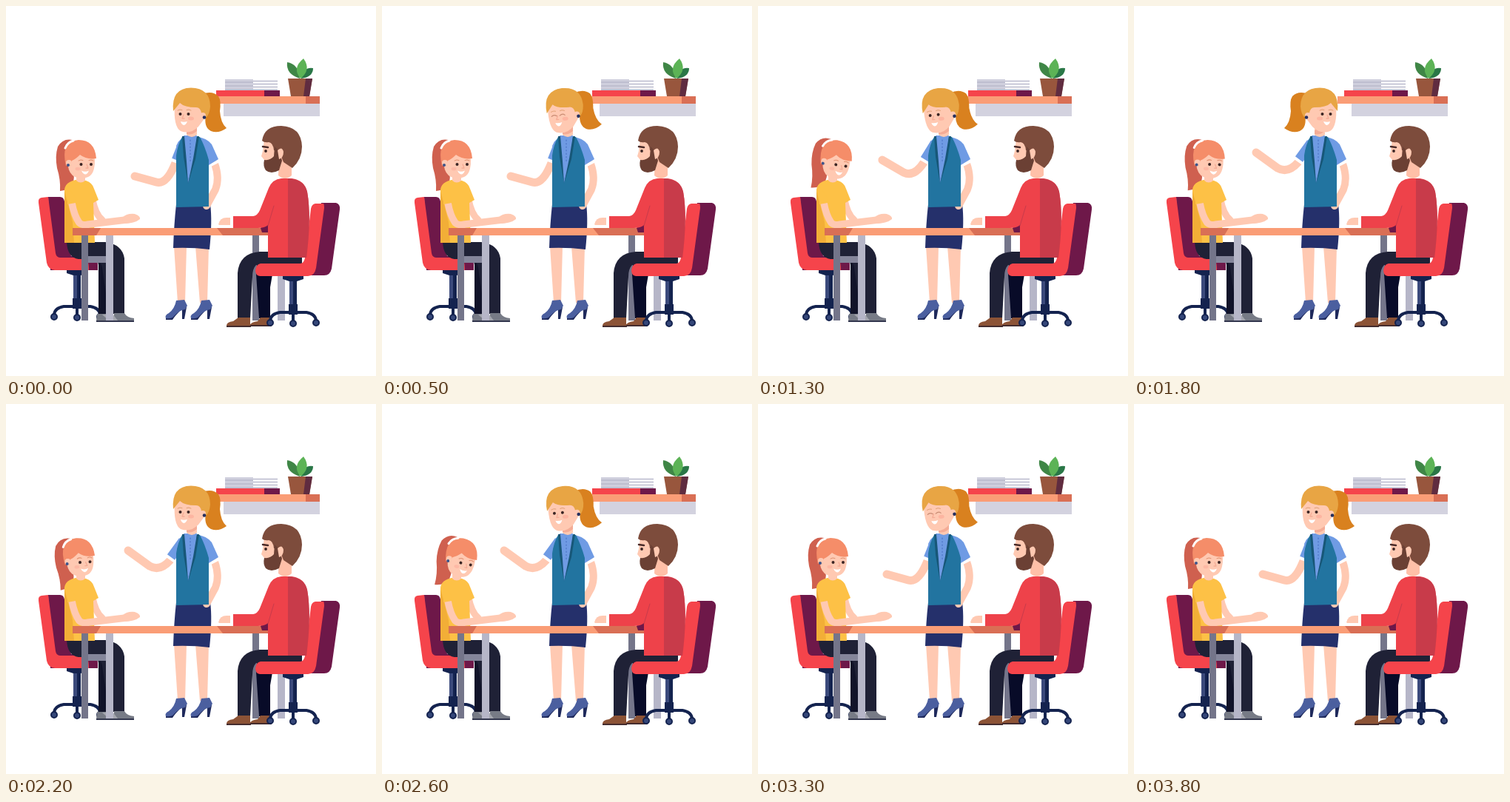
Write an HTML page that moves like this. It is 500 px wide and 500 px high and loops after 4000 ms.

```html
<!DOCTYPE html>
<html lang="en">
<head>
<meta charset="utf-8">
<title>Office meeting</title>
<style>
html, body { margin: 0; width: 100%; height: 100%; overflow: hidden; background: #fff; }
svg { display: block; width: 100vw; height: 100vh; }
.skin { fill: #ffc9b2; }
.limb { fill: none; stroke: #ffc9b2; stroke-linecap: round; stroke-linejoin: round; }
.red { fill: #f5444b; }
.plum { fill: #6e1849; }
.navy { fill: #14234f; }
.line { fill: none; stroke-linecap: round; stroke-linejoin: round; }
.cut { fill: none; }
</style>
</head>
<body>
<svg viewBox="0 0 500 500">
<defs>
  <g id="base">
    <path fill="#3b4a7c" d="M-5-47H5V-6H-5z"/>
    <path class="navy" d="M-14-47H14V-43L5-40H-5L-14-43zM0-47H5V-6H0zM-6-9H6V5H-6z"/>
    <path class="line" stroke="#14234f" stroke-width="4" d="M-31 13Q-30 4 -18 2H18Q30 4 31 13M0 2V14"/>
    <g fill="#354779" stroke="#14234f" stroke-width="2"><circle cx="-31" cy="16" r="4"/><circle cx="31" cy="16" r="4"/><circle cy="17" r="4"/></g>
  </g>
  <g id="heel">
    <path fill="#1f2a5c" d="M26 4L28 8 25 24H22L22 10Q12 20 9 25H0V22z"/>
    <path fill="#4b5f9f" d="M14-1L25-2 29 6 26 11Q18 12 11 20Q8 24 0 23Q-2 19 4 16Q12 10 14-1z"/>
  </g>
</defs>

<!-- shelf -->
<path fill="#d3d2df" d="M294 132H424V149H294z"/>
<path fill="#fa9d76" d="M275 122H424V132H275z"/>
<path fill="#d96f55" d="M405 122H424V132H405z"/>
<path class="red" d="M284 114H350V122H284z"/>
<path class="plum" d="M349 114H370V122H349z"/>
<path fill="#cfcfdd" d="M296 99H334V114H296z"/>
<path stroke="#b9b9cc" stroke-width="1.300" d="M296 103H334M296 108H334M296 113H367M334 101.500H367M334 105.500H367M334 109.500H367"/>
<path fill="#3f8646" d="M397 98Q378 92 380 76Q395 78 397 98z"/>
<path fill="#2a7747" d="M399 98Q401 82 415 84Q415 96 399 98z"/>
<path fill="#5cb356" d="M398 98Q386 84 402 71Q413 86 398 98z"/>
<path fill="#98563d" d="M381 98H414L410 122H385z"/>
<path fill="#602c40" d="M405 98H414L410 122H402z"/>

<!-- standing woman -->
<path class="skin" d="M227 325H244L242 401H232zM256 325H274L272 401H262z"/>
<use href="#heel" x="216" y="399"/><use href="#heel" x="250" y="399"/>
<path fill="#25306b" d="M230 268H276Q279 290 275 329Q252 326 226 327Q227 295 230 268z"/>
<path id="arm" class="limb" stroke-width="11"/>
<path id="cuff" class="cut" stroke="#fff" stroke-width="13"/>
<path id="sleeve" class="cut" stroke="#6f9be4" stroke-width="12.500"/>
<path class="limb" stroke-width="10" d="M282 213Q289 233 283 248L271 270"/>
<path fill="#fff" d="M272 215L288 207 289 211 275 218z"/>
<path fill="#6f9be4" d="M258 177Q271 178 278 187L287 207 274 215 266 205z"/>
<path fill="#6f9be4" d="M241 177Q234 180 230 189L236 205z"/>
<path fill="#2274a0" d="M238 177H262Q269 190 274 208L274 271 230 272 230 202Q232 187 238 177z"/>
<path fill="#6f9be4" d="M240 175H258L255 205 246 239 242 205z"/>
<path fill="#175778" d="M238 176H241L244 210 246 240 240 204zM258 176H261L256 207 246 240 253 206z"/>
<path class="line" stroke="#4970c2" stroke-dasharray="1.500 3" d="M249 181V212"/>
<path class="skin" d="M244 155H258V174Q251 180 244 174z"/>
<path fill="#f4ac96" d="M244 168L258 162V169Q251 175 244 173z"/>
<g id="womanHead">
  <path fill="#d9811f" d="M265 119Q279 114 287 122Q291 128 289 142Q290 158 298 165Q287 173 277 169Q267 164 270 148z"/>
  <path class="skin" d="M228 133Q226 163 236 169Q249 174 260 163L269 151 266 122H235z"/>
  <path fill="#e8a544" d="M226 142Q223 111 250 110.500Q276 111 276 136Q275 147 270 151L264 145Q263 137 257 137Q241 137 235 131Q231 136 226 142z"/>
  <circle class="skin" cx="266" cy="148" r="4"/><circle cx="268" cy="150.500" r="2.300" fill="#26305f"/>
  <g id="openEyes" fill="#3b2524"><circle cx="235.500" cy="146" r="2"/><circle cx="246.500" cy="146" r="2"/></g>
  <path id="shutEyes" class="line" stroke="#c98c74" stroke-width="1.200" d="M232 147Q235 144 239 147M243 147Q247 144 250 147"/>
  <path class="line" stroke="#e0a076" d="M232 141Q235 139 238 140.500M244 140.500Q247 139 250 141"/>
  <path class="line" stroke="#f4ac96" stroke-width="1.300" d="M240 147L238 152H241"/>
  <ellipse cx="250" cy="152" rx="4" ry="2.500" fill="#fdb5a1"/>
  <path fill="#fff" d="M236 156Q240 157.500 245 156Q243 161 240 161Q237 160 236 156z"/>
</g>

<!-- seated girl -->
<path class="plum" d="M57 258H73Q78 258 79 264L88 338H112Q124 339 124 350V357H60z"/>
<path class="red" d="M48 259L57 258 67 334Q68 340 74 340H106Q112 341 112 357H66Q57 356 55 347L44 266Q43 260 48 259z"/>
<use href="#base" x="96" y="404"/>
<path fill="#111329" d="M90 325H130Q142 328 142 342V416H125V350Q124 342 114 342H98z"/>
<path fill="#1f2136" d="M82 319H134Q157 322 160 341V416H139L130 354Q128 342 116 342H98Q83 340 82 319z"/>
<path fill="#777b86" d="M123 416H143L151 426H122zM146 415H160Q163 421 173 422V426H146z"/>
<path fill="#a4a6ae" d="M130 417L139 425H151L144 416z"/>
<path stroke="#32364e" stroke-width="2" d="M122 426H173"/>
<path id="girlTail" fill="#cf604f" d="M90 181Q77 178 70 190Q66 203 69 219Q74 235 73 250Q86 249 91 238Q94 226 86 214L83 195z"/>
<path class="limb" stroke-width="9" d="M117 262Q121 282 130 289"/>
<path fill="#fdc146" d="M86 238Q96 232 108 236Q117 239 119 247L125 262 118 266 120 320H79V248Q80 241 86 238z"/>
<path fill="#f2ae37" d="M79 250L84 268 90 292 92 320H79z"/>
<path class="limb" stroke-width="9.500" d="M89 266Q92 283 99 293Q103 297 112 295L162 289"/>
<path class="skin" d="M157 286Q163 280 174 281Q182 284 181 288Q174 294 158 294z"/>
<path fill="#fdc146" d="M82 242L95 261 94 266 83 268z"/>
<path class="skin" d="M95 225H107V236Q101 241 95 236z"/>
<g id="girlHead">
  <path class="skin" d="M83 207Q83 223 90 229Q100 236 111 231Q120 227 120 209L119 196H88z"/>
  <path fill="#f58d69" d="M81 216Q73 183 98 181Q120 181 122 206Q109 208 100 201Q94 207 89 209L87 216z"/>
  <path class="line" stroke="#fff" stroke-width="3" d="M80 192Q83 184 91 182"/>
  <circle class="skin" cx="85" cy="212" r="4"/><circle cx="84" cy="215" r="2" fill="#3e568c"/>
  <g fill="#3b2524"><circle cx="101.500" cy="214" r="2"/><circle cx="115" cy="214" r="2"/></g>
  <path class="line" stroke="#e0906f" d="M98 209Q101 207 104 208.500M112 208.500Q115 207 118 209"/>
  <path class="line" stroke="#f4ac96" stroke-width="1.300" d="M109 214L111 219H108"/>
  <ellipse cx="97" cy="220" rx="3.500" ry="2.300" fill="#fdb9a5"/>
  <path fill="#fff" d="M102 222.500Q107 225 112 222.500Q110 227.500 107 227.500Q104 227 102 222.500z"/>
</g>

<!-- table -->
<path fill="#74758a" d="M102 310H111V425H102zM333 310H342V425H333z"/>
<path fill="#85869b" d="M111 338H135V347H111z"/>
<path fill="#b6b6c8" d="M135 310H145V425H135zM367 310H377V425H367z"/>
<path fill="#fa9d76" d="M90 300H356V310H90z"/>
<path fill="#d96f55" d="M90 300H128L122 310H90zM285 300H356V310H293z"/>

<!-- seated man -->
<path class="plum" d="M344 300L355 288V306H346z"/>
<path fill="#080b28" d="M340 340H364L357 380V422H342L338 362z"/>
<path fill="#1f2136" d="M362 332H400V350H338Q333 355 333 366L330 422H313V361Q315 334 343 332z"/>
<path fill="#8c5336" d="M314 421H330V432H298Q298 427 307 426zM344 421H357L359 431 329 432Q331 427 340 426z"/>
<path stroke="#442c2e" stroke-width="2" d="M298 433H331M330 432H359"/>
<path class="plum" d="M426 266H446Q452 268 451 275L440 355Q438 364 430 364H408z"/>
<path class="red" d="M418 267H429Q430 268 430 273L419 354Q417 365 408 365H343Q337 364 337 357Q338 349 344 348H398Q403 347 404 340L412 274Q413 268 418 267z"/>
<use href="#base" x="388" y="412"/>
<path class="skin" d="M287 295Q289 286 298 286H306V296H288z"/>
<path fill="#fff" d="M303 285H309V299H303z"/>
<path fill="#ee424a" d="M372 233H386Q403 235 407 251Q413 285 406 340H354V296Q350 300 340 300H307V284H334Q340 283 343 276L355 246Q360 234 372 233z"/>
<path fill="#c83b4a" d="M381 233Q403 234 407 251Q413 285 406 340H381z"/>
<path class="line" stroke="#c83b4a" d="M354 297L362 270"/>
<path fill="#ffc0a8" d="M369 204H386V229Q377 237 368 229z"/>
<path class="skin" d="M349 180L347 196 345 203 349 208 350 213H372V178z"/>
<path fill="#7d4c3c" d="M346 182Q349 162 372 162Q399 163 400 190Q400 207 387 219L375 211 369 196 362 195Q361 185 355 184Q349 185 346 182z"/>
<path fill="#6b4034" d="M363 190L369 196 373 209 369 222Q358 228 351 222Q347 216 349 208Q357 209 362 203z"/>
<path class="skin" d="M367 195Q373 189 375 197Q375 205 369 207z"/>
<path class="line" stroke="#4a2b29" stroke-width="2.500" d="M347 190L354 191"/>
<circle cx="351" cy="196" r="1.900" fill="#3b2524"/>
</svg>
<script>
const LOOP = 4000, STEP = 100;
const $ = id => document.getElementById(id);

// Eased interpolation through [time, value] pairs.
function track(t, keys) {
  let [t0, v0] = keys[0];
  for (const [t1, v1] of keys) {
    if (t < t1) {
      const k = Math.max(0, (t - t0) / (t1 - t0));
      return v0 + (v1 - v0) * k * k * (3 - 2 * k);
    }
    [t0, v0] = [t1, v1];
  }
  return v0;
}

const within = (t, a, b) => t >= a && t < b;

function drawArm(p) {
  const at = (a, b) => a + (b - a) * p;
  const cx = at(229, 222), cy = at(212, 211);
  $('arm').setAttribute('d', `M${at(174, 165)} ${at(230, 198)}L${at(203, 194)} ${at(238, 219)}` +
    `Q${at(217, 208)} ${at(242, 227)} ${cx} ${cy}`);
  $('cuff').setAttribute('d', `M238 188L${cx} ${cy}`);
  $('sleeve').setAttribute('d', `M239 185L${cx + 1} ${cy - 4}`);
}

function render(time) {
  const t = Math.floor(time % LOOP / STEP) * STEP;
  const tilt = track(t, [[0, 0], [500, -6.5], [1300, -6.5], [1600, 0], [2200, 0], [2700, -6.5], [3300, -6.5], [3800, 0]]);
  const flip = within(t, 1600, 2200) ? 'translate(501 0) scale(-1 1) ' : '';
  $('womanHead').setAttribute('transform', `${flip}rotate(${tilt} 252 172)`);

  const shut = within(t, 400, 700) || within(t, 3200, 3500);
  $('openEyes').style.display = shut ? 'none' : '';
  $('shutEyes').style.display = shut ? '' : 'none';

  const nod = track(t, [[800, 0], [1300, 9], [1800, 1.5], [2150, -4], [2600, 12], [3200, 0]]);
  for (const id of ['girlHead', 'girlTail']) $(id).setAttribute('transform', `rotate(${nod} 101 238)`);

  drawArm(track(t, [[800, 0], [1600, 1], [2600, 1], [3250, 0]]));
}

function tick() {
  render(performance.now());
  requestAnimationFrame(tick);
}
tick();
</script>
</body>
</html>
```
